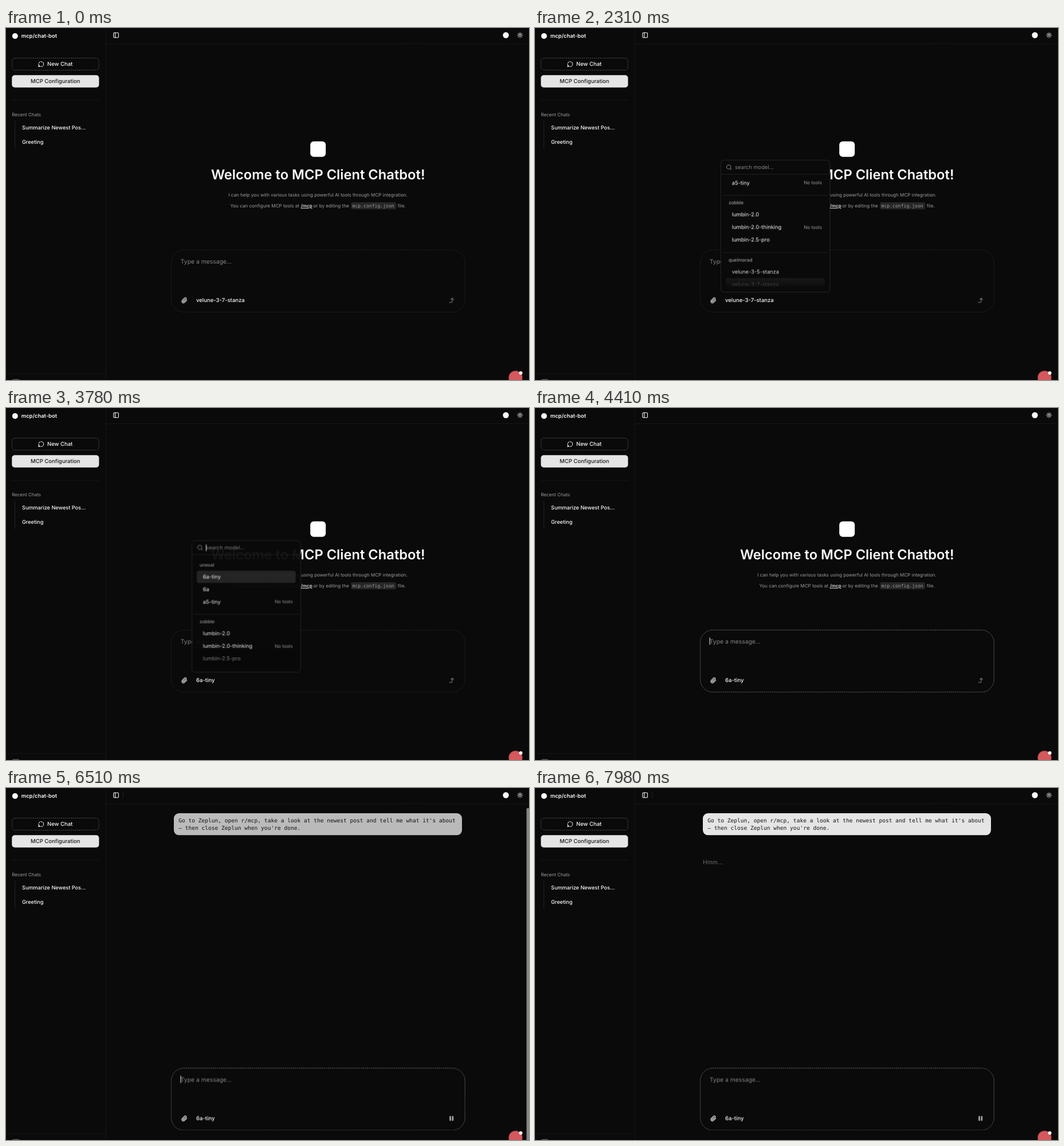
Recreate the animation shown at these times as an HTML page. Size 913 by 614 pixels, loop 8000 ms.

```html
<!DOCTYPE html>
<html lang="en">
<head>
<meta charset="utf-8">
<title>Chat client</title>
<style>
html, body { margin: 0; height: 100%; overflow: hidden; background: #0a0a0a; }
svg { display: block; width: 100vw; height: 100vh; }
text {
  font-family: Inter, "Open Sans", sans-serif; font-size: 9.3px; fill: #fafafa;
  text-rendering: geometricPrecision; font-optical-sizing: none; white-space: pre;
}
.ui { font-size: 9.5px; font-weight: 500; }
.chat { font-size: 9.15px; font-weight: 450; }
.small { font-size: 8.1px; fill: #9c9c9c; }
.body { font-size: 10.35px; }
.mono { font-family: "DejaVu Sans Mono", monospace; }
.hint { fill: #848484; }
.line { fill: none; stroke: #272727; stroke-width: .8; }
.dash { stroke-dasharray: 2 1.5; }
.icon { fill: none; stroke: #fafafa; stroke-width: 2.2; stroke-linecap: round; stroke-linejoin: round; }
.caret { fill: #fafafa; }
</style>
</head>
<body>
<svg viewBox="0 0 913 614">
  <defs>
    <linearGradient id="fade" x1="0" y1="0" x2="0" y2="1">
      <stop offset="0" stop-color="#0a0a0a" stop-opacity="0"/>
      <stop offset="1" stop-color="#0a0a0a" stop-opacity=".92"/>
    </linearGradient>
    <clipPath id="listBox"><rect x="325" y="256" width="190" height="196"/></clipPath>
  </defs>
  <rect width="913" height="614" fill="#0a0a0a"/>

  <!-- sidebar -->
  <path class="line dash" d="M174.3 0V614M174 27.5H913M10 126H163M0 602.8H174"/>
  <circle cx="15.8" cy="14" r="5" fill="#fafafa"/>
  <text class="ui" x="26.7" y="17.1" style="font-size:9.4px;font-weight:600">mcp/chat-bot</text>
  <rect class="line dash" x="10.6" y="52.5" width="151.6" height="21" rx="5" style="stroke:#666"/>
  <g class="icon" transform="translate(55.8 57.5) scale(.455)">
    <circle cx="12" cy="12" r="9.5" stroke-dasharray="5 3.5"/><path d="M4 17l-2 5 5-1.5"/>
  </g>
  <text class="ui" x="72" y="66.3">New Chat</text>
  <rect x="10.3" y="82.2" width="152.1" height="21.6" rx="5" fill="#e5e5e5"/>
  <text class="ui" x="86.3" y="96.4" text-anchor="middle" style="fill:#171717">MCP Configuration</text>
  <text class="small" x="10.2" y="153.5">Recent Chats</text>
  <path class="line" d="M15.5 162V211"/>
  <text class="chat" x="28" y="177.2">Summarize Newest Pos...</text>
  <text class="chat" x="28" y="201.8">Greeting</text>
  <rect x="10.5" y="612.6" width="13.5" height="8" rx="3" fill="#555"/>

  <!-- header -->
  <g class="icon" style="stroke-width:1.05">
    <rect x="187.8" y="8.3" width="8.6" height="8.4" rx="1.2"/><path d="M190.8 8.3v8.4"/>
    <circle cx="897.3" cy="12.5" r="1.9"/><path id="rays"/>
  </g>
  <path id="headSep" class="line" d="M204.6 7V18"/>
  <circle cx="872.6" cy="12.5" r="5.2" fill="#fafafa"/>

  <!-- welcome -->
  <g id="welcome">
    <rect x="531.2" y="197.8" width="27" height="27" rx="6" fill="#fff"/>
    <text x="544.7" y="264.3" text-anchor="middle" style="font-size:23.7px;font-weight:600">Welcome to MCP Client Chatbot!</text>
    <text class="small" x="544.6" y="293.8" text-anchor="middle">I can help you with various tasks using powerful AI tools through MCP integration.</text>
    <text class="small" x="391.4" y="313">You can configure MCP tools at</text>
    <text class="small" x="514.8" y="313" style="fill:#fafafa;font-weight:500;text-decoration:underline">/mcp</text>
    <text class="small" x="536.5" y="313">or by editing the</text>
    <rect x="602.3" y="304" width="78.8" height="12.2" rx="2.8" fill="#262626"/>
    <text class="small mono" x="604.6" y="312.9">mcp.config.json</text>
    <text class="small" x="683.8" y="313">file.</text>
  </g>

  <!-- conversation -->
  <g id="bubble">
    <rect x="293" y="44" width="503" height="38.3" rx="9" fill="#e5e5e5"/>
    <text class="mono" style="font-size:9.57px;fill:#171717">
      <tspan x="301.2" y="59.6">Go to Zeplun, open r/mcp, take a look at the newest post and tell me what it's about</tspan>
      <tspan x="301.2" y="73.2">— then close Zeplun when you're done.</tspan>
    </text>
  </g>
  <text id="hmm" class="body" x="293" y="133" style="fill:#6c6c6c">Hmm...</text>
  <rect id="pageBar" x="908.6" y="35" width="5" height="585" rx="2.4" fill="#858585"/>

  <!-- message box -->
  <g id="box">
    <rect id="border" class="line" x="288.4" y="387.3" width="512.8" height="108.3" rx="22" style="stroke-dasharray:2 1.4"/>
    <text id="hint" class="body hint" x="304.8" y="410.6">Type a message...</text>
    <text id="prompt" class="body">
      <tspan x="304.8" y="410.6">Go to Zeplun, open r/mcp, take a look at the newest post and tell me what it's about — then close</tspan>
      <tspan x="304.8" y="427">Zeplun when you're done.</tspan>
    </text>
    <rect id="caretA" class="caret" x="304.6" y="400.4" width="1" height="12.6"/>
    <rect id="caretB" class="caret" x="430.6" y="416.8" width="1" height="12.6"/>
    <path class="icon" transform="translate(306 469.6) scale(.455)" d="M21.4 11.05l-9.2 9.2a6 6 0 0 1-8.5-8.5l8.6-8.57a4 4 0 1 1 5.65 5.67l-8.58 8.57a2 2 0 0 1-2.83-2.83l8.5-8.5"/>
    <rect id="pickBg" x="324" y="464" width="102" height="22" rx="5" fill="#262626"/>
    <text id="before" class="ui" x="332" y="478.4">velune-3-7-stanza</text>
    <text id="after" class="ui" x="332" y="478.4">6a-tiny</text>
    <rect id="sendBg" x="765" y="462.5" width="25" height="24.5" rx="9" fill="#1e1e1e"/>
    <path id="send" class="icon" transform="translate(772.2 469.5) scale(.455)" d="M10 9l5-5 5 5M4 20h7a4 4 0 0 0 4-4V4"/>
    <path id="pause" d="M774.2 471h2.7v8h-2.7zM778.5 471h2.7v8h-2.7z" fill="#a8a8a8"/>
  </g>

  <!-- model picker -->
  <g id="panel" style="transform-origin:324.5px 461px">
    <rect class="line" x="324.4" y="230.4" width="190.4" height="230.4" rx="5.5" style="fill:#0a0a0a;stroke:#303030"/>
    <g class="icon" transform="translate(333.2 237.4) scale(.455)" style="stroke:#858585">
      <circle cx="11" cy="11" r="8"/><path d="M21 21l-4.3-4.3"/>
    </g>
    <text class="hint" x="349" y="246.4">search model...</text>
    <rect id="caretC" class="caret" x="349" y="237.3" width="1" height="11.8"/>
    <path class="line" d="M325 255.2H514.5"/>
    <g clip-path="url(#listBox)">
      <g id="list"><rect id="mark" x="333" y="-10.75" width="173" height="21.5" rx="4" fill="#262626"/></g>
    </g>
    <rect x="326" y="420" width="182" height="32" fill="url(#fade)"/>
    <rect id="thumb" x="508.5" y="257" width="4.8" height="84.3" rx="2.4" fill="#8f8f8f"/>
  </g>

  <!-- status badge -->
  <circle cx="889.5" cy="610" r="12.2" fill="#d4585c" stroke="#4a2224" stroke-width=".8"/>
  <circle cx="898.6" cy="601.8" r="3" fill="#fafafa"/>
</svg>
<script>
const LOOP = 8000;
const $ = id => document.getElementById(id);
const make = (name, attrs, text = '') => {
  const el = document.createElementNS('http://www.w3.org/2000/svg', name);
  for (const k in attrs) el.setAttribute(k, attrs[k]);
  el.textContent = text;
  return $('list').appendChild(el);
};

// Sun rays around the header icon
$('rays').setAttribute('d', Array.from({ length: 8 }, (_, i) => {
  const c = Math.cos(i * Math.PI / 4), s = Math.sin(i * Math.PI / 4);
  return `M${897.3 + 3.7 * c} ${12.5 + 3.7 * s}L${897.3 + 4.5 * c} ${12.5 + 4.5 * s}`;
}).join(''));

// Picker groups; a trailing * marks a model without tools
const groups = [
  [273.3, 'unexal', '6a-tiny', '6a', 'a5-tiny*'],
  [372.5, 'zobble', 'lumbin-2.0', 'lumbin-2.0-thinking*', 'lumbin-2.5-pro'],
  [472.3, 'quelmorad', 'velune-3-5-stanza', 'velune-3-7-stanza']
];
groups.forEach(([y, title, ...models], g) => {
  if (g) make('path', { class: 'line', d: `M328 ${y - 13}H512` });
  make('text', { class: 'small', x: 338, y: y + 2.8, style: 'font-weight:500' }, title);
  models.forEach((m, i) => {
    const rowY = y + 20.6 + 21.75 * i;
    make('text', { x: 343.8, y: rowY + 3.3 }, m.replace('*', ''));
    if (m.endsWith('*')) make('text', { class: 'small', x: 501, y: rowY + 3, 'text-anchor': 'end' }, 'No tools');
  });
});

// Steps are [time, value, easing to the next step]; the default is a hard cut
const run = (id, prop, steps) => {
  const frames = steps.map(([t, v, easing = 'step-end']) => ({ offset: t / LOOP, [prop]: v, easing }));
  frames.push({ offset: 1, [prop]: steps.at(-1)[1] });
  return $(id).animate(frames, { duration: LOOP, iterations: Infinity });
};
const fade = (id, ...steps) => run(id, 'opacity', steps);
const move = (id, ...steps) => run(id, 'transform', steps.map(([t, y, e]) => [t, `translateY(${y}px)`, e]));
// Shown from the first time, hidden from the second, and so on
const blink = (id, ...times) => fade(id, [0, 0], ...times.map((t, i) => [t, 1 - i % 2]));

const CHAT = 6440, DIM = '#303030', LIT = '#8f8f8f';
const away = 'translateY(5.5px) scale(.95)', home = 'translateY(0px) scale(1)';

const all = [
  run('border', 'stroke', [[0, DIM], [900, DIM, 'ease'], [1060, LIT], [1870, LIT, 'ease'], [1990, DIM],
    [4110, DIM, 'ease'], [4230, LIT]]),
  fade('pickBg', [0, 0], [1180, 0, 'ease'], [1330, 1], [1870, 1, 'ease'], [1990, 0]),
  fade('panel', [0, 0], [1544, 0, 'ease'], [1694, 1], [3770, 1, 'ease'], [3960, 0]),
  run('panel', 'transform', [[0, away], [1544, away, 'ease'], [1694, home], [3770, home, 'ease'], [3960, away]]),
  move('list', [0, -67.5], [2490, -67.5, 'ease-out'], [2660, 0]),
  move('thumb', [0, 28.2], [2490, 28.2, 'ease-out'], [2660, 0]),
  fade('thumb', [0, 1], [2080, 1, 'linear'], [2310, 0], [2520, 1], [3130, 1, 'linear'], [3360, 0]),
  move('mark', [0, 514.5], [2870, 393.1], [3010, 337.4], [3150, 315.7], [3290, 293.9]),
  blink('caretC', 1540, 2100, 2590, 3150, 3640),
  fade('before', [0, 1], [3780, 0]),
  blink('after', 3780),
  blink('caretA', 4410, 4970, CHAT, 6940, 7470, 7980),
  blink('caretB', 4970, 5460, 6020, 6160),
  fade('hint', [0, 1], [4970, 0], [CHAT, 1]),
  blink('prompt', 4970, CHAT),
  run('send', 'stroke', [[0, '#8a8a8a'], [4950, '#8a8a8a', 'ease'], [5040, '#fafafa']]),
  fade('send', [0, 1], [CHAT, 0]),
  fade('sendBg', [0, 0], [6010, 0, 'ease'], [6150, 1], [CHAT, 0]),
  blink('pause', CHAT),
  fade('welcome', [0, 1], [CHAT, 0]),
  blink('headSep', CHAT),
  move('box', [0, 0], [CHAT, 101.4]),
  fade('bubble', [0, 0], [6420, 0, 'ease'], [6600, 1]),
  fade('pageBar', [0, 0], [6510, 1], [6850, 1, 'linear'], [7100, 0]),
  fade('hmm', [0, 0], [6920, 0, 'ease'], [7300, 1])
];
const start = document.timeline.currentTime ?? 0;
all.forEach(a => { a.startTime = start; });
</script>
</body>
</html>
```
